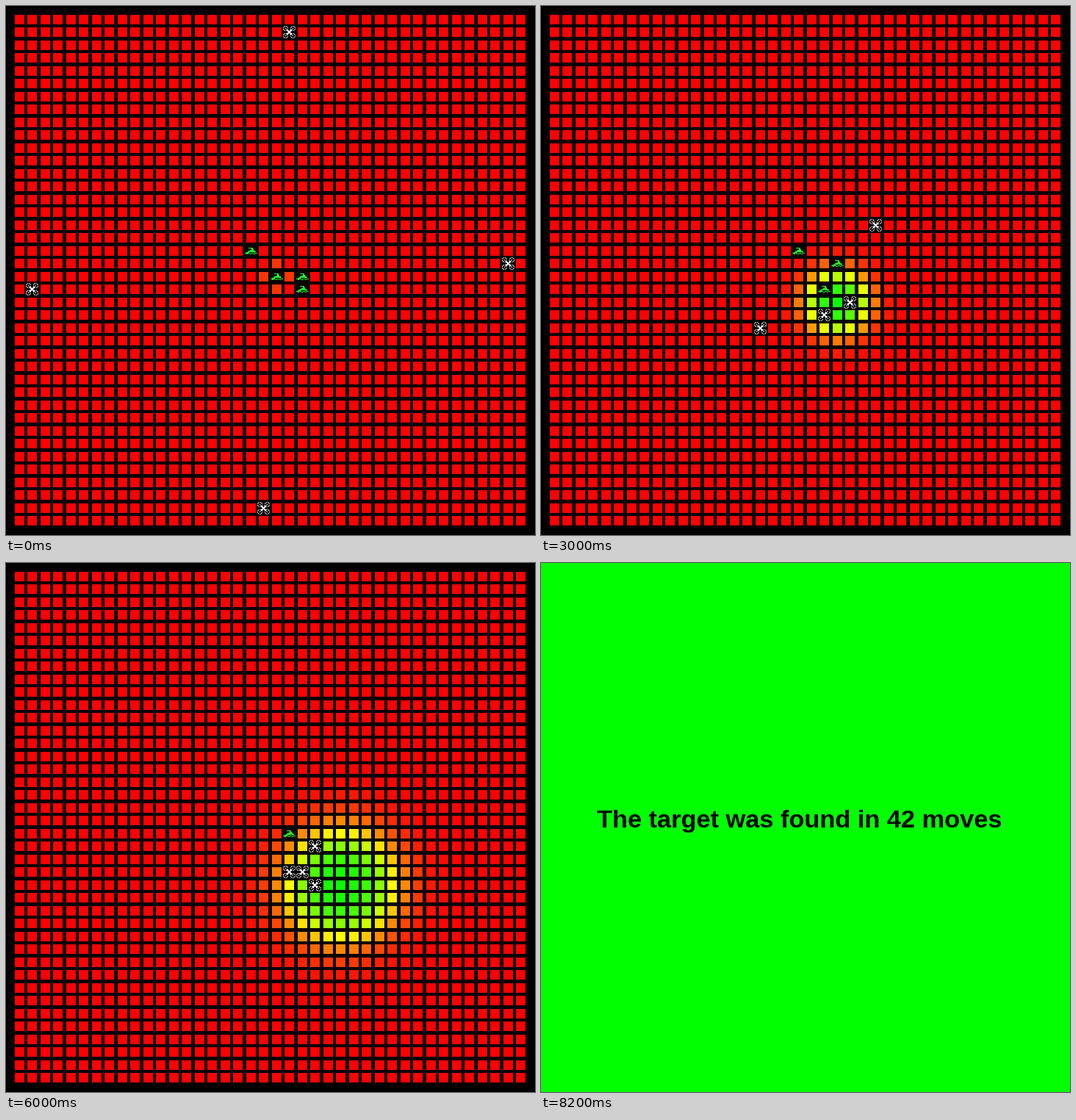
Recreate the animation shown at these times as a matplotlib script. Size 720 by 720 pixels, loop 8400 ms.

```python
import numpy as np
import matplotlib.pyplot as plt
from matplotlib.animation import FuncAnimation

SIZE, CELLS, PITCH, EDGE = 720, 40, 17.5, 10
STEPS, STEP_MS = 42, 200
ICON, SQUARE = 17, 13
WHITE, LIME, GREEN = (255, 255, 255), (34, 255, 34), (0, 255, 0)
HUNT = 22  # step at which the drones begin to sweep together

# Sweep depth, then start, turn and arrival cells
DRONES = [
    (0, (21, 1), (27, 12), (22, 21)),
    (2, (1, 21), (12, 26), (20, 21)),
    (2, (38, 19), (27, 22), (22, 22)),
    (2, (19, 38), (20, 27), (21, 21)),
]
# Step at which the swimmer is found, start and end cells
SWIMMERS = [
    (41, (18, 18), (22.5, 22.5)),
    (14, (20, 20), (20, 23)),
    (30, (22, 20), (22, 20)),
    (25, (22, 21), (20, 23)),
]


def drone_mask():
    y, x = np.abs(np.mgrid[-8:9, -8:9])
    ring = np.abs(np.hypot(x - 5, y - 5) - 3) < 0.6
    dotted = ring & ((x + y) % 2 == 0)
    body = (np.abs(x - y) <= 1) & (np.maximum(x, y) <= 3)
    tips = (x == y) & (x <= 5)
    return dotted | body | tips


def stroke(points, width):
    """Mask of all icon pixels within half a width of a polyline."""
    y, x = np.mgrid[0:ICON, 0:ICON]
    mask = np.zeros((ICON, ICON), bool)
    for (x0, y0), (x1, y1) in zip(points, points[1:]):
        dx, dy = x1 - x0, y1 - y0
        t = ((x - x0) * dx + (y - y0) * dy) / (dx * dx + dy * dy)
        t = np.clip(t, 0, 1)
        mask |= np.hypot(x - x0 - t * dx, y - y0 - t * dy) <= width / 2
    return mask


def swimmer_mask():
    arm = stroke([(5, 4), (9, 4), (11, 8)], 1.8)
    torso = stroke([(2, 11), (7, 8), (11, 8)], 2.1)
    head = stroke([(13, 9), (13.5, 9)], 2.1)
    x = np.arange(ICON)
    wave = np.zeros((ICON, ICON), bool)
    wave[np.round(11.5 - 0.6 * np.cos(x * np.pi / 2.5)).astype(int), x] = True
    return arm | torso | head | wave


DRONE, SWIMMER = drone_mask(), swimmer_mask()


def drone_cell(dip, keys, step):
    """One cell per step along the key cells, then a shared sweep."""
    cells = np.array(keys)
    legs = np.abs(np.diff(cells, axis=0)).max(axis=1)
    when = np.concatenate([[0], np.cumsum(legs)])
    t = max(0, step - HUNT)
    col = np.interp(step, when, cells[:, 0]) + t / 12
    row = np.interp(step, when, cells[:, 1])
    row += dip * np.sin(np.pi * min(1, t / 14))
    return round(col), round(row)


def swimmer_cell(found, start, end, step):
    """Eased drift with a bob of one row."""
    ease = (step / found) ** 1.4
    col, row = (round(a + (b - a) * ease) for a, b in zip(start, end))
    return col, row - round(np.sin(np.pi * step / HUNT) ** 2)


def stamp(img, mask, cell, colour):
    x, y = (int(EDGE + PITCH * c) for c in cell)
    box = img[y:y + ICON, x:x + ICON]
    box[:] = 0
    box[mask] = colour


def heat(step):
    """Round likelihood patch that drifts diagonally and widens."""
    cx = 20 + step // 6
    cy = 20 + max(0, (step - 3) // 6)
    radius = 0.65 + 0.112 * step
    row, col = np.mgrid[0:CELLS, 0:CELLS]
    distance = np.hypot(col - cx, row - cy)
    return 1 / (1 + np.exp(4 * (distance / radius - 1)))


def board(step):
    img = np.zeros((SIZE, SIZE, 3), np.uint8)
    p = heat(step)
    red = np.minimum(255, 510 * (1 - p)).astype(int)
    green = np.minimum(255, 510 * p).astype(int)
    starts = [int(EDGE + 2 + PITCH * i) for i in range(CELLS)]
    for r, y in enumerate(starts):
        for c, x in enumerate(starts):
            img[y:y + SQUARE, x:x + SQUARE] = red[r, c], green[r, c], 0
    for found, start, end in SWIMMERS:
        if step < found:
            stamp(img, SWIMMER, swimmer_cell(found, start, end, step), LIME)
    for dip, *keys in DRONES:
        stamp(img, DRONE, drone_cell(dip, keys, step), WHITE)
    return img


fig = plt.figure(figsize=(10, 10), dpi=72, facecolor="black")
ax = fig.add_axes([0, 0, 1, 1])
ax.axis("off")
view = ax.imshow(board(0), extent=(0, SIZE, SIZE, 0),
                 interpolation="nearest", aspect="auto")
message = ax.text(75.5, 360, "The target was found in 42 moves",
                  family="Liberation Sans", weight="bold", size=34.4,
                  color="black", visible=False)


def draw(step):
    done = step == STEPS - 1
    if done:
        view.set_data(np.full((SIZE, SIZE, 3), GREEN, np.uint8))
    else:
        # The last stretch runs at half speed
        view.set_data(board(step - step % 2 if step > 34 else step))
    message.set_visible(done)
    return view, message


anim = FuncAnimation(fig, draw, frames=STEPS, interval=STEP_MS, repeat=True,
                     repeat_delay=0, cache_frame_data=False)
plt.show()
```
